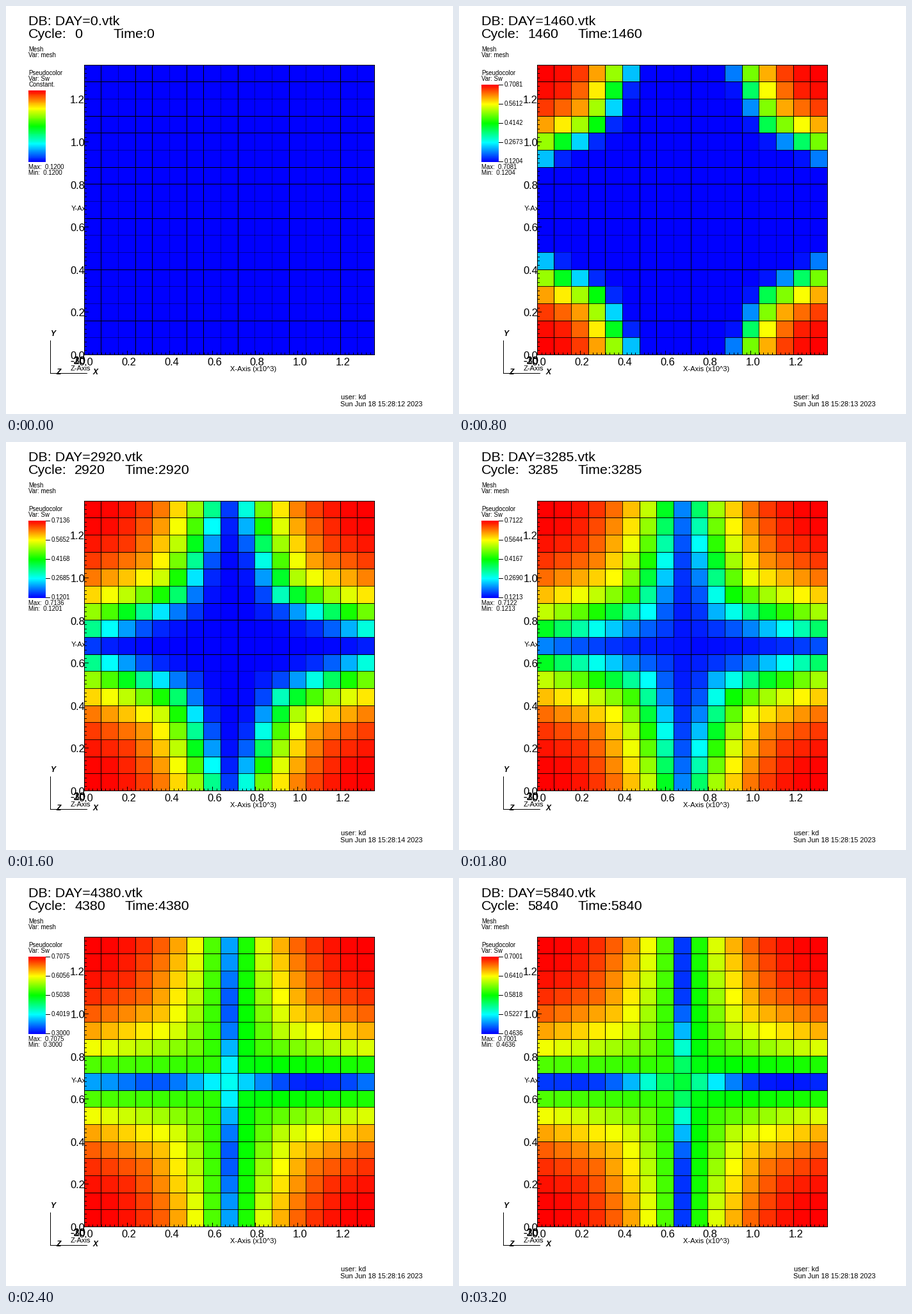
These frames come from a looping animation (698x638 px, 3.4 s). A matplotlib script:

```python
import numpy as np
import matplotlib.pyplot as plt
from matplotlib.animation import FuncAnimation
from matplotlib.collections import LineCollection

W, H, DPI = 698, 638, 100
PX = 72 / DPI
N, MID, STEPS, DAYS = 17, 8, 17, 365
CELL = 26.667
STRONG = [i for i in range(N + 1) if i % 3 == 0 or i in (1, 4, 7, 17)]
WEAK = [i for i in range(N + 1) if i not in STRONG]
edge_x = np.round(121.7 + CELL * np.arange(N + 1))
edge_y = np.round(91.7 + CELL * np.arange(N + 1))


def value_range(step):
    if step < 2:
        return (.12, .12) if step == 0 else (.1199, .1199)
    keys = [2, 4, 6, 8, 10, 12, 16]
    low = np.interp(step, keys, [.1202, .1204, .1203, .1201, .1225, .3, .4636])
    high = np.interp(step, keys, [.69, .7081, .7107, .7136, .7107, .7075, .7001])
    return low, high


def flood_profile(xi):
    """Falling saturation behind the water front, with a steep front at 1."""
    body = np.maximum(0, 1 - .55 * xi ** 2.55)
    return body / (1 + np.exp((xi - 1.01) / .057))


def field(step):
    """Saturation per cell, scaled to 0..1."""
    if step < 2:
        return np.zeros((N, N))
    row, col = np.mgrid[:N, :N]
    dy, dx = MID - abs(row - MID), MID - abs(col - MID)
    far, near = np.maximum(dx, dy), np.minimum(dx, dy)
    right = col > MID

    # Octagonal fronts leave the corner wells and flatten at the middle lines.
    flatten = np.clip((step - 6) / 8, 0, .6)
    dist = far + (.48 - flatten * (far / MID) ** 2) * near
    dist = dist * np.where(right, 1.03, 1)
    front = min(8.1, 8.9 - 8 * .794 ** (step - 1))
    sat = flood_profile(dist / front)

    # The middle cross fills from its ends and later from its centre.
    if step >= 10:
        ends = (.21 - .026 * (step - 10)) * np.exp(-((near + 2 * right) / 3.3) ** 2)
        centre = .5 * (1 - np.exp((10 - step) / 2.7))
        centre = centre * np.exp(-((MID - near + .5 * right) / 3.1) ** 2)
        sat = np.where(far == MID, ends + centre, sat)
    return sat


def rainbow(v):
    return np.clip(np.stack([4 * v - 2, 2 - abs(4 * v - 2), 2 - 4 * v], -1), 0, 1)


fig = plt.figure(figsize=(W / DPI, H / DPI), dpi=DPI, facecolor="white")
ax = fig.add_axes([0, 0, 1, 1])
ax.axis("off")


def label(x, y, text="", size=9.7, **kw):
    """Text whose capitals are centred on y; the mesh hides what it covers."""
    return ax.text(x, y + .36 * size, text, fontsize=size * PX, zorder=2,
                   family="Liberation Sans", va="baseline", **kw)


def lines(segments):
    return ax.add_collection(LineCollection(
        segments, linewidths=PX, colors="black", antialiaseds=False, zorder=4))


mesh = ax.pcolormesh(edge_x, edge_y, rainbow(field(0)), antialiased=False, zorder=3)
bar = ax.imshow(rainbow(np.linspace(1, 0, 121))[:, None], aspect="auto",
                extent=(35, 62, 244, 132), interpolation="nearest")

# Mesh lines
x0, x1, y0, y1 = edge_x[0], edge_x[-1], edge_y[0], edge_y[-1]
lines([[(edge_x[i], y0), (edge_x[i], y1)] for i in STRONG]
      + [[(x0, edge_y[i]), (x1, edge_y[i])] for i in STRONG])
weak = lines([[(edge_x[i], edge_y[j]), (edge_x[i], edge_y[j + 1])]
              for i in WEAK for j in range(N)]
             + [[(edge_x[j], edge_y[i]), (edge_x[j + 1], edge_y[i])]
                for i in WEAK for j in range(N)])

# Axis ticks and labels
ticks = []
for i in range(68):
    size, shift = (6 if i % 10 == 0 else 3), i * CELL / 4
    ticks += [[(x0 + shift, y1), (x0 + shift, y1 - size)],
              [(x0, y1 - shift), (x0 + size, y1 - shift)]]
lines(ticks)
for i in range(7):
    label(125 + 66.8 * i, 556, f"{i / 5:.1f}", 16.5, ha="center")
    label(123, 546 - 66.6 * i, f"{i / 5:.1f}", 16.5, ha="right")
for text in ("-30", "-20", "-10"):
    label(124, 554.5, text, 16.5, ha="right")
label(350, 567, "X-Axis (x10^3)", 11.1)
label(102, 316, "Y-Axis", 11.1)
label(101, 566, "Z-Axis", 11.1)

# Orientation triad
lines([[(69, 523), (69, 574)], [(69, 574), (126, 574)]])
for x, y, text in ((74, 512, "Y"), (140, 572, "X"), (82, 572, "Z")):
    label(x, y, text, 12, ha="center", weight="bold", style="italic")

# Captions and legend
title = label(35, 22, size=21.5)
label(35, 42, "Cycle:", 21.5)
cycle = label(107, 42, size=21.5)
clock = label(167, 42, size=21.5)
for y, text in ((68, "Mesh"), (77, "Var: mesh"), (105, "Pseudocolor"), (114, "Var: Sw")):
    label(35, y, text)
constant = label(35, 123, "Constant.")
high_label = label(35, 252)
low_label = label(35, 261)
scale_y = np.linspace(123, 243, 5)
scale_marks = lines([[(62, y), (68, y)] for y in scale_y])
scale_labels = [label(71, y - .5) for y in scale_y]
label(523, 611, "user: kd", 11)
stamp = label(522, 622, size=11)

ax.set_xlim(0, W)
ax.set_ylim(H, 0)


def update(step):
    sat, (low, high), day = field(step), value_range(step), step * DAYS
    uniform = step < 2
    mesh.set_array(rainbow(sat))

    # Minor mesh lines are faint inside the unswept region.
    beside = [np.maximum(sat[:, i - 1], sat[:, i]) for i in WEAK]
    beside += [np.maximum(sat[i - 1], sat[i]) for i in WEAK]
    rgba = np.zeros((2 * len(WEAK) * N, 4))
    rgba[:, 3] = np.where(np.concatenate(beside) < .05, .35, .85)
    weak.set_color(rgba)

    title.set_text(f"DB: DAY={day}.vtk")
    cycle.set_text(f"{day}")
    clock.set_text(f"Time:{day}")
    clock.set_x(161 + 6 * len(str(day)))
    constant.set_visible(uniform)
    bar.set_extent((35, 62, 244, 132 if uniform else 123))
    scale_marks.set_visible(not uniform)
    for text, v in zip(scale_labels, np.linspace(high, low, 5)):
        text.set_text("" if uniform else f"{v:.4f}")
    high_label.set_text(f"Max:  {high:.4f}")
    low_label.set_text(f"Min:  {low:.4f}")
    stamp.set_text(f"Sun Jun 18 15:28:{12 + int((step - 1) / 2.5)} 2023")


anim = FuncAnimation(fig, update, frames=STEPS, init_func=lambda: update(0),
                     interval=200, repeat=True, repeat_delay=0, blit=False)
plt.show()
```
